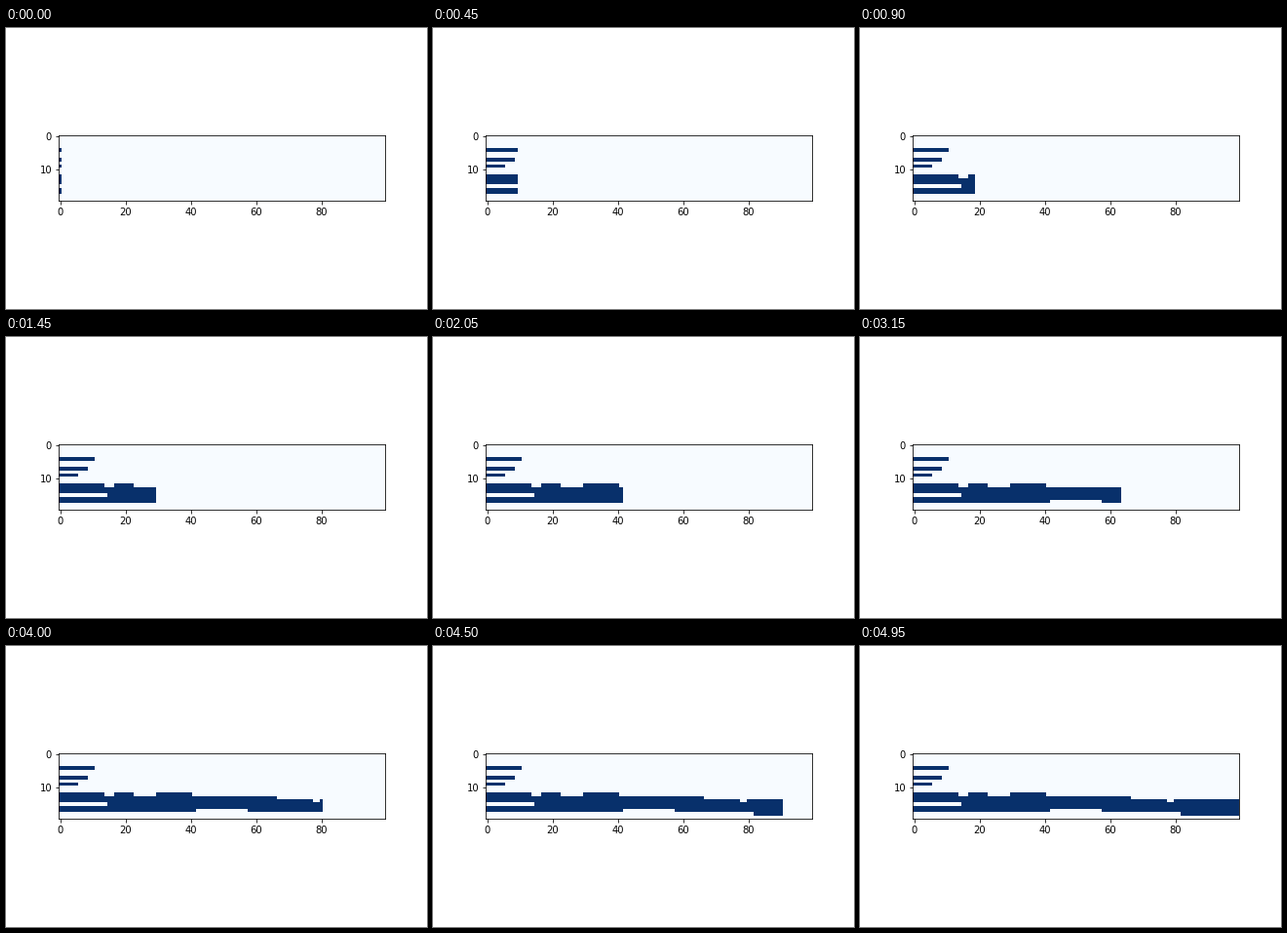
Animation of 432x288 px, one loop 5 s. Source, as a matplotlib script:

```python
import matplotlib.pyplot as plt
import numpy as np
from matplotlib.animation import FuncAnimation

ROWS, COLS = 20, 100
INTERVAL = 50

# Filled column spans (start, stop) of each row
SPANS = {
    4: [(0, 11)],
    7: [(0, 9)],
    9: [(0, 6)],
    12: [(0, 14), (17, 23), (30, 41)],
    13: [(0, 67)],
    14: [(0, 78), (80, COLS)],
    15: [(15, COLS)],
    16: [(0, COLS)],
    17: [(0, 42), (58, COLS)],
    18: [(82, COLS)],
}

grid = np.zeros((ROWS, COLS))
for row, spans in SPANS.items():
    for start, stop in spans:
        grid[row, start:stop] = 1

plt.rcParams.update({"font.family": "DejaVu Sans", "font.size": 10})
fig, ax = plt.subplots(figsize=(6, 4), dpi=72, facecolor="white")
fig.subplots_adjust(left=0.125, right=0.9, bottom=0.125, top=0.88)
image = ax.imshow(np.zeros_like(grid), cmap="Blues", vmin=0, vmax=1,
                  interpolation="nearest")
ax.set_xticks(range(0, COLS, 20))
ax.set_yticks(range(0, ROWS, 10))


def reveal(step):
    """Show the columns up to and including the current step."""
    shown = np.zeros_like(grid)
    shown[:, :step + 1] = grid[:, :step + 1]
    image.set_data(shown)
    return [image]


anim = FuncAnimation(fig, reveal, frames=COLS, interval=INTERVAL,
                     repeat=True, repeat_delay=0)
plt.show()
```
